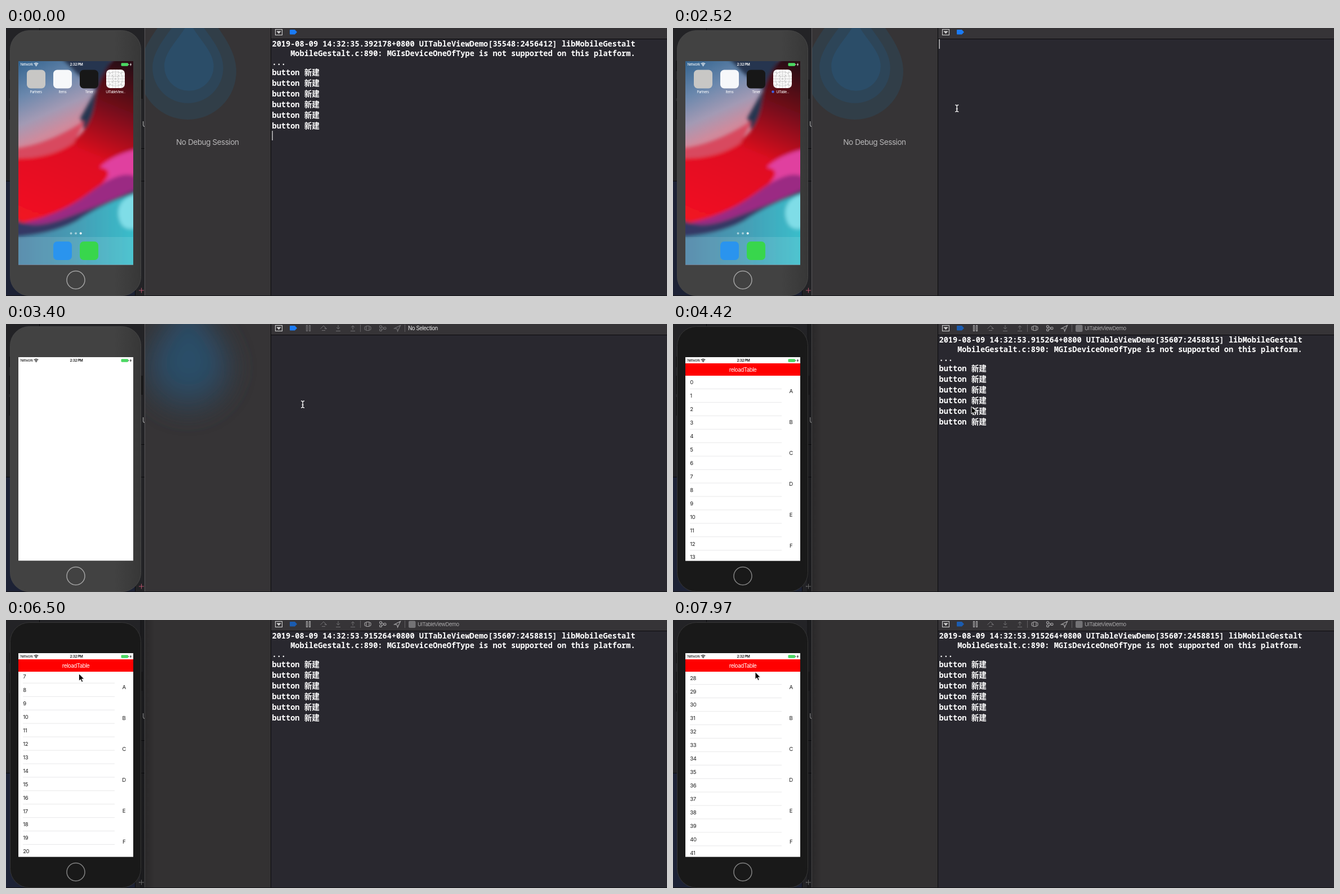
Write an HTML page that moves like this. It is 1174 px wide and 477 px high and loops after 8 s.

```html
<!DOCTYPE html>
<html lang="en">
<head>
<meta charset="utf-8">
<style>
html, body { margin: 0; width: 100%; height: 100%; overflow: hidden; background: #29282f; }
svg { display: block; font-family: Inter, Roboto, sans-serif; letter-spacing: -.03em; }
.mid { text-anchor: middle; }
#log { font: bold 13.62px "Noto Sans Mono", "Noto Sans CJK SC", "Noto Sans CJK", monospace; letter-spacing: 0; fill: #fff; }
.line { fill: none; stroke: currentColor; }
</style>
</head>
<body>
<svg width="1174" height="477" viewBox="0 0 1174 477">
  <defs>
    <linearGradient id="sky" x1="0" y1="0" x2=".25" y2="1">
      <stop offset="0" stop-color="#34648f"/>
      <stop offset=".17" stop-color="#6b88ad"/>
      <stop offset=".3" stop-color="#a39ab4"/>
      <stop offset=".4" stop-color="#d08a9c"/>
    </linearGradient>
    <linearGradient id="sea">
      <stop offset="0" stop-color="#4a7fa3"/>
      <stop offset=".5" stop-color="#469cb4"/>
      <stop offset="1" stop-color="#38c0cc"/>
    </linearGradient>
    <linearGradient id="ember" x1=".7" y1="0" x2=".4" y2="1">
      <stop offset="0" stop-color="#2c0814"/>
      <stop offset=".25" stop-color="#75091a"/>
      <stop offset=".55" stop-color="#df0d20"/>
      <stop offset="1" stop-color="#f01222"/>
    </linearGradient>
    <linearGradient id="shell">
      <stop offset=".8" stop-color="#424242"/>
      <stop offset="1" stop-color="#373737"/>
    </linearGradient>
    <linearGradient id="shade">
      <stop offset="0" stop-color="#000" stop-opacity=".28"/>
      <stop offset="1" stop-color="#000" stop-opacity="0"/>
    </linearGradient>
    <filter id="soft"><feGaussianBlur stdDeviation="3"/></filter>
    <filter id="haze" x="-50%" y="-50%" width="200%" height="200%"><feGaussianBlur id="blur" stdDeviation="0"/></filter>
    <clipPath id="screen"><rect x="22" y="59" width="204" height="362.5"/></clipPath>
    <clipPath id="list"><rect x="22" y="92" width="204" height="329.5"/></clipPath>
    <clipPath id="panel"><rect x="247" width="223" height="476"/></clipPath>
    <path id="drop" d="M0-165C15-110 86-60 86 0A86 86 0 0 1-86 0C-86-60-15-110 0-165Z"/>
    <g id="grid">
      <rect width="33" height="33" rx="7" fill="#fff"/>
      <g fill="none" stroke="#8d8d8d" stroke-width=".3">
        <path d="M1 1L32 32M32 1L1 32M0 16.5H33M16.5 0V33M0 5.5H33M0 11.5H33M0 21.5H33M0 27.5H33M5.5 0V33M11.5 0V33M21.5 0V33M27.5 0V33"/>
        <circle cx="16.5" cy="16.5" r="13.5"/><circle cx="16.5" cy="16.5" r="8.3"/><circle cx="16.5" cy="16.5" r="5"/>
      </g>
    </g>
  </defs>

  <!-- desktop and editor edge behind the phone -->
  <rect width="247" height="477" fill="#232326"/>
  <rect y="272" width="229" height="205" fill="#1d2235"/>
  <path d="M59.5 0V10M0 272.5H247M229 214.5H247M229.5 440V477" stroke="#0c0c0e"/>
  <text x="242" y="175.5" font-size="12.5" fill="#b5b5b5">U</text>
  <path id="plus" d="M236 467H245M240.5 462.5V471.5"/>

  <!-- debug panel -->
  <rect x="246" width="225" height="477" fill="#363436"/>
  <path d="M246.5 0V477" stroke="#59575a"/>
  <g clip-path="url(#panel)"><g id="drops" filter="url(#haze)">
    <use href="#drop" transform="translate(323 77)" fill="#313e48"/>
    <use href="#drop" transform="translate(323 71)scale(.73)" fill="#2d4558"/>
    <use href="#drop" transform="translate(325 68)scale(.51)" fill="#2b4d68"/>
  </g></g>
  <text id="idle" class="mid" x="358" y="208" font-size="13.6" fill="#b8b7b8">No Debug Session</text>
  <rect id="dull" x="247" width="223" height="477" fill="#333132"/>

  <!-- console -->
  <rect x="470" width="704" height="477" fill="#29282f"/>
  <rect x="471" width="703" height="19" fill="#363437"/>
  <path d="M470.5 0V477M470 19.5H1174" stroke="#0b0b0d"/>
  <g class="line" color="#d0d0d0" stroke-width="1.1">
    <rect x="478.5" y="2.5" width="12" height="10"/>
    <path d="M481.5 6L484.5 9.5L487.5 6Z" fill="#d0d0d0"/>
  </g>
  <path id="tag" d="M505 3H513L517 7.3L513 11.5H505Q504 11.5 504 10.5V4Q504 3 505 3Z"/>
  <g id="tools">
    <g id="live" class="line" stroke-width="1.1">
      <path d="M533.5 2.5H535.5V12.5H533.5ZM538.5 2.5H540.5V12.5H538.5Z"/>
      <path d="M640 3.5H645V11.5H640ZM639 4.5Q637 4.5 637 6V9Q637 10.5 639 10.5M646 4.5Q648 4.5 648 6V9Q648 10.5 646 10.5"/>
      <circle cx="665.5" cy="4.5" r="2"/><circle cx="665.5" cy="10.5" r="2"/><circle cx="673" cy="7.5" r="2"/>
      <path d="M667.3 5.2L671 6.8M667.3 9.8L671 8.2M689.5 8L700.5 2.5L695.5 13L694.5 8.5Z"/>
    </g>
    <path class="line" color="#717073" d="M558.5 8.5L564 3L569.5 8.5H566.5V6.5M561 11.5H567M590 2V9M587 6L590 9L593 6M586 12.5H594M616 10V3M613 6L616 3L619 6M612 12.5H620"/>
    <path d="M629.5 1V14M708.5 1V14" stroke="#626064"/>
  </g>
  <text id="choice" x="714" y="11" font-size="9.75" fill="#e8e8e8">No Selection</text>
  <g id="target">
    <rect x="715" y="1.5" width="12.5" height="12.5" rx="2.5" fill="#747376"/>
    <text x="731" y="11" font-size="9.4" fill="#a9a8aa">UITableViewDemo</text>
  </g>
  <g id="log"></g>
  <rect id="caret" x="472.5" width="1.2" height="17" fill="#e8e8e8"/>
  <g id="bezel">
    <rect x="492" y="383" width="166" height="110" rx="17" fill="#2e2d32"/>
    <path class="line" color="#a9a9ab" stroke-width="1.6" stroke-linejoin="round" d="M558 477L569 446L570 442L575 424C574 418 567 416 557 417C564 412 572 411 580 412L588 413C592 414 594 417 597 419L602 421L599 432L591 429C588 428 586 428 585 430L579 450L578 453L569 477"/>
  </g>
  <path d="M0 476.5H1174" stroke="#151518"/>

  <!-- phone -->
  <rect id="shadow" x="238" width="26" height="477" fill="url(#shade)"/>
  <path d="M7 58V77M7 92V125M7 130V163M241.5 92V126" stroke="#141415" stroke-width="3"/>
  <rect id="body" x="7.5" y="4.5" width="232" height="472" rx="34"/>
  <circle id="button" cx="124" cy="448.5" r="16" fill="none" stroke-width="1.5"/>
  <g clip-path="url(#screen)">
    <g id="home">
      <rect x="22" y="59" width="204" height="363" fill="url(#sky)"/>
      <g filter="url(#soft)">
        <path d="M95 50H190L165 105L158 150L144 195L132 160L160 110L125 80Z" fill="#283650"/>
        <path d="M235 50H195Q165 80 158 130Q152 185 110 205Q70 218 10 215V360H235Z" fill="url(#ember)"/>
        <path d="M10 215Q70 210 140 165L120 205Q75 235 10 232Z" fill="#d8495f"/>
        <path d="M235 215Q190 225 166 248Q195 252 170 278L130 310L235 300Z" fill="#e0409f"/>
        <path d="M10 350Q90 338 150 292T235 268V320L100 365H10Z" fill="#9b2c83"/>
        <path d="M10 335Q40 362 100 340Q170 315 235 285V430H10Z" fill="#353865"/>
        <path d="M10 372Q80 368 125 344Q175 310 235 293V430H10Z" fill="url(#sea)"/>
        <path d="M235 293Q195 305 200 335T235 355Z" fill="#7fdde7"/>
      </g>
      <rect x="22" y="372" width="204" height="50" fill="#fff" opacity=".1"/>
      <g id="icons">
        <g id="apps"></g>
        <use href="#grid" x="178" y="74"/>
        <rect id="wait" x="178" y="74" width="33" height="33" rx="7" fill="#000" opacity=".42"/>
        <g fill="#fff" font-size="6.2" class="mid">
          <text x="53" y="115.5">Partners</text>
          <text x="100.5" y="115.5">Items</text>
          <text x="147.5" y="115.5">Timer</text>
          <text id="appName" x="194.5" y="115.5"></text>
        </g>
        <circle id="fresh" cx="177.5" cy="113.5" r="2.3" fill="#3f63e6"/>
        <g fill="#fff"><circle cx="115.5" cy="365.5" r="1.9" opacity=".5"/><circle cx="124" cy="365.5" r="1.9" opacity=".5"/><circle cx="132.7" cy="365.5" r="1.9"/></g>
      </g>
      <rect id="dim" x="22" y="59" width="204" height="363"/>
    </g>
    <g id="zoom">
      <rect id="sheet" fill="#fff"/>
      <rect id="strip" fill="#aaa"/>
      <use id="big" href="#grid"/>
    </g>
    <g id="table">
      <rect x="22" y="59" width="204" height="363" fill="#fff"/>
      <g clip-path="url(#list)"><g id="rows" font-size="9.5" fill="#1c1c1c"></g></g>
      <g id="index" class="mid" font-size="9.6" fill="#1c1c1c"></g>
      <rect x="22" y="70" width="204" height="22" fill="#f00"/>
      <text class="mid" x="124" y="84.5" font-size="9.7" fill="#fff">reloadTable</text>
    </g>
    <g id="status" fill="currentColor">
      <text x="25.5" y="67.2" font-size="6.3">Network</text>
      <path class="line" stroke-width="1.2" d="M49.8 63.8Q53.5 60.8 57.2 63.8M51.2 65.6Q53.5 63.8 55.8 65.6"/>
      <circle cx="53.5" cy="67" r="1"/>
      <text class="mid" x="125" y="67.2" font-size="6.5" font-weight="600">2:32 PM</text>
      <rect x="204.5" y="62.3" width="12.5" height="5.4" rx="1.4" fill="#4bd863"/>
      <path d="M217.6 64H218.4V66H217.6ZM222.2 61.8L220 65.4H221.3L220.8 68.2L223 64.6H221.7Z"/>
    </g>
  </g>

  <path id="beam" class="line" color="#f2f2f2" stroke-width="1.4" d="M-3-6Q0-6 0-4Q0-6 3-6M0-4V4M-3 6Q0 6 0 4Q0 6 3 6M-1.5 1H1.5"/>
  <path id="arrow" d="M0 0V13L3 10.3L5 15L7.2 14L5.2 9.5H9.3Z" fill="#000" stroke="#fff" stroke-width=".9"/>
</svg>
<script>
const $ = id => document.getElementById(id);
const set = (id, attrs) => { for (const k in attrs) $(id).setAttribute(k, attrs[k]); };
const show = (id, on) => { $(id).style.display = on ? "" : "none"; };
const text = (x, y, s) => `<text x="${x}" y="${y}">${s}</text>`;
const range = n => [...Array(n).keys()];

const LOOP = 8000, TICK = 147.6, ROW = 23.93;

// Linear interpolation over [tick, value, value...] keys
function at(keys, n, i = 1) {
  const k = keys.findIndex(key => key[0] > n);
  if (k < 0) return keys[keys.length - 1][i];
  if (k === 0) return keys[0][i];
  const a = keys[k - 1], b = keys[k];
  return a[i] + (b[i] - a[i]) * (n - a[0]) / (b[0] - a[0]);
}
const launch = [[18, 0], [19, .04], [20, .2], [21, .64], [22, .94], [23, 1]];
const mouse = [[16, 500, 143], [20, 517, 143], [23, 527, 143], [26, 530, 147], [30, 530, 147],
  [32, 440, 178], [35, 215, 258], [37, 145, 277], [38, 144, 272], [41, 135, 190], [44, 129.5, 95.5],
  [45, 130, 92], [47, 143, 250], [48, 147, 268], [50, 150, 175], [51, 148, 78], [53, 146, 92.5]];
const scroll = [[37, 0], [38, 5], [40, 42], [42, 102], [44, 170.7], [45, 205], [46, 255], [47, 295],
  [48, 318], [49, 352], [50, 420], [51, 515], [52, 590], [53, 640], [54, 670.8]];

$("apps").innerHTML = [[53.5, 91, "#c8c7c5"], [100.5, 91, "#f7f8fa"], [147.5, 91, "#171717"],
  [100.5, 396.5, "#2a94ee"], [147.5, 396.5, "#38d64c"]].map(([x, y, c]) =>
  `<rect x="${x - 16.5}" y="${y - 16.5}" width="33" height="33" rx="7" fill="${c}"/>`).join("");
$("rows").innerHTML = range(60).map(i => text(30.3, 107.4 + i * ROW, i) +
  `<path d="M30 ${115.5 + i * ROW}H193" stroke="#e2e2e4" stroke-width=".8"/>`).join("");
$("index").innerHTML = [..."ABCDEF"].map((c, i) => text(209.5, 122.8 + 55 * i, c)).join("");
$("log").innerHTML = text(472.5, 33, "") +
  text(505.2, 50, "MobileGestalt.c:890: MGIsDeviceOneOfType is not supported on this platform.") +
  text(472.5, 66, "...") + range(6).map(i => text(472.5, 84 + 19 * i, "button 新建")).join("");

function drawPhone(n) {
  const dark = n >= 25, installing = n >= 6 && n < 11, p = at(launch, n);
  set("body", { fill: dark ? "#191919" : "url(#shell)", stroke: dark ? "#363636" : "#474747" });
  set("button", { stroke: dark ? "#838383" : "#a3a3a3" });
  set("plus", { stroke: dark ? "#8a8a8a" : "#b4536c" });
  show("shadow", dark);
  show("home", n < 23);
  show("wait", installing);
  show("fresh", n >= 6);
  $("appName").textContent = n < 6 ? "UITableView..." : "UITable...";
  set("icons", { transform: `translate(124 240)scale(${1 - .05 * p})translate(-124 -240)` });
  set("dim", { opacity: Math.min(.5, .9 * p) });

  // The icon grows and stretches into the launch screen
  const w = 33 + 171 * p, h = 33 + 329.5 * p ** 1.25;
  const x = 194.5 - 70.5 * p - w / 2, y = 90.5 + 149.75 * p - h / 2;
  show("zoom", p > 0);
  set("sheet", { x, y, width: w, height: h, rx: 7 * w / 33 * (1 - p) });
  set("strip", { x: x + w * .19, y: y + w, width: w * .62, height: Math.max(0, h - w), opacity: p < .5 ? 1 : 0 });
  set("big", { transform: `translate(${x} ${y})scale(${w / 33})`, opacity: Math.max(0, Math.min(1, 1.3 - 1.5 * p)) });

  show("table", n >= 25);
  set("rows", { transform: `translate(0 ${-at(scroll, n)})` });
  $("status").style.color = n >= 22 ? "#111" : "#fff";
}

function drawEditor(n) {
  const running = n >= 27;
  show("drops", n < 27);
  set("drops", { opacity: at([[23, 1], [27, 0]], n) });
  set("blur", { stdDeviation: at([[20, 0], [23, 18]], n) });
  set("idle", { opacity: at([[20, 1], [23, 0]], n) });
  show("dull", running);
  set("tag", { fill: running ? "#1b5cb0" : "#1b7bf4" });
  show("tools", n >= 22);
  $("live").style.color = running ? "#a9a8aa" : "#717073";
  show("choice", n >= 22 && !running);
  show("target", running);

  show("log", n < 5 || n >= 26);
  $("log").firstChild.textContent = "2019-08-09 14:32:" + (n < 5 ? "35.392178" : "53.915264") +
    "+0800 UITableViewDemo[" + (n < 5 ? "35548:2456412" : "35607:2458815") + "] libMobileGestalt";
  show("caret", n < 5 || (n >= 11 && n < 14) || (n >= 17 && n < 21));
  set("caret", { y: n < 5 ? 183 : 20 });
  show("bezel", n >= 3 && n < 10);
  set("bezel", { opacity: at([[2, 0], [5, 1]], n) });
}

function draw(ms) {
  const n = Math.floor((ms % LOOP + 10) / TICK);
  drawPhone(n);
  drawEditor(n);
  const transform = `translate(${at(mouse, n)} ${at(mouse, n, 2)})`;
  set("beam", { transform });
  set("arrow", { transform });
  show("beam", n >= 16 && n < 26);
  show("arrow", n >= 26);
}

let start;
function loop(now) {
  start ??= now;
  draw(now - start);
  requestAnimationFrame(loop);
}
draw(0);
requestAnimationFrame(loop);
</script>
</body>
</html>
```
